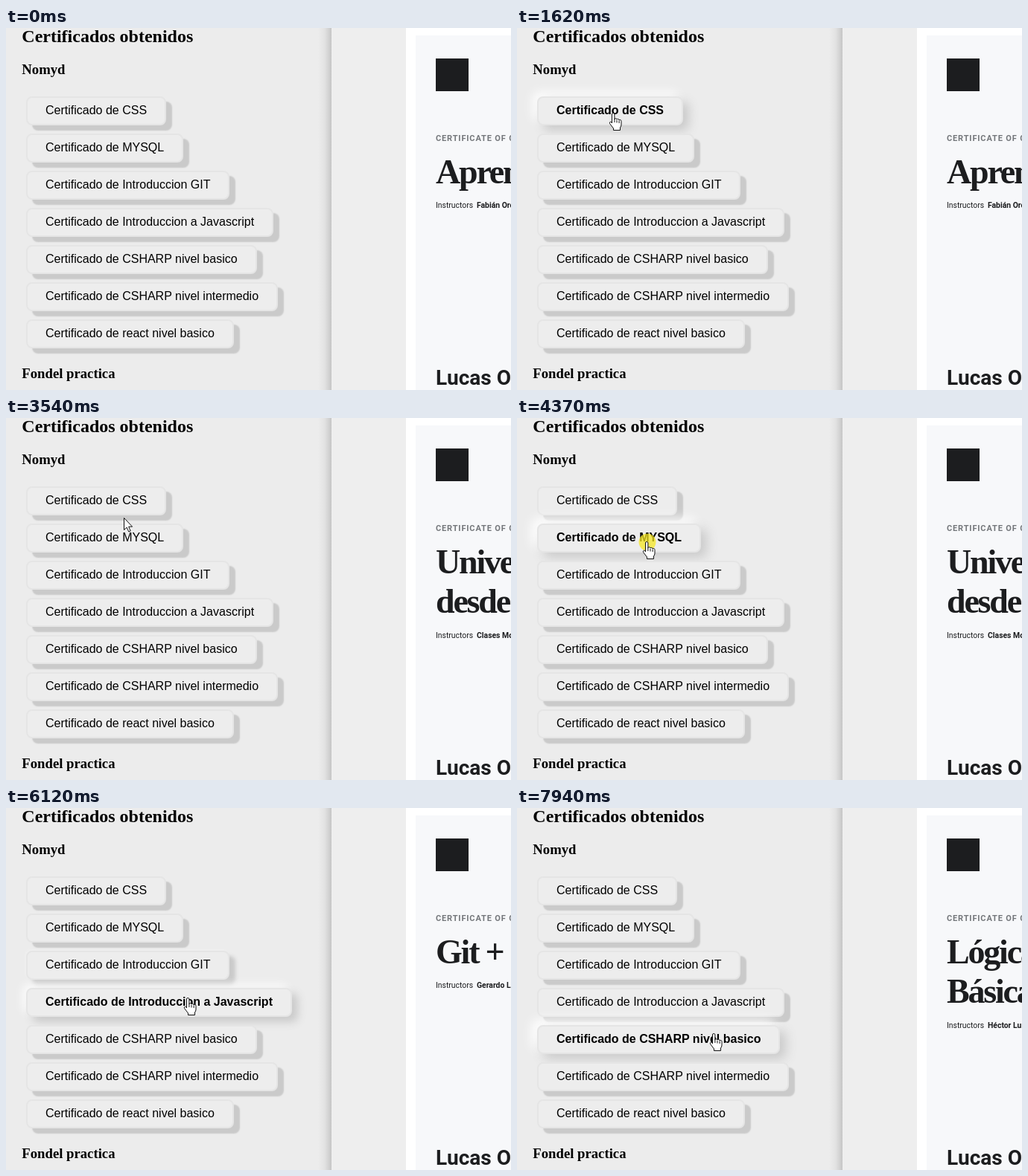
Animation of 678 by 487 pixels, one loop 8000 ms. Source, as an HTML page:

```html
<!DOCTYPE html>
<html lang="es">
<head>
<meta charset="utf-8">
<title>Certificados obtenidos</title>
<style>
  html, body { margin: 0; width: 100%; height: 100%; overflow: hidden; background: #ececec; }
  #stage { position: relative; width: 678px; height: 487px; overflow: hidden; background: #ececec; }
  svg { position: absolute; left: 0; top: 0; width: 678px; height: 487px; }
  .row {
    position: absolute; left: 27px; box-sizing: border-box; height: 39px;
    padding: 8px 24px 10px; border: 2px solid #e5e5e5; border-radius: 8px;
    background: #ededed; color: #000; white-space: nowrap;
    font: 16px/17px "Liberation Sans", Arial, sans-serif;
  }
  .heading { font-family: "Liberation Serif", "Times New Roman", serif; font-weight: 700; }
  .title { font: 700 46px "Liberation Serif", "Times New Roman", serif; letter-spacing: -2.2px; fill: #1c1d1f; }
  .sans { font-family: Roboto, "Liberation Sans", sans-serif; fill: #1c1d1f; }
</style>
</head>
<body>
<div id="stage">
  <svg viewBox="0 0 678 487">
    <defs>
      <linearGradient id="edge">
        <stop offset="0" stop-color="#ececec"/>
        <stop offset=".5" stop-color="#e2e2e2"/>
        <stop offset="1" stop-color="#c6c6c6"/>
      </linearGradient>
    </defs>
    <rect x="419" width="18" height="487" fill="url(#edge)"/>
    <rect x="437" width="100" height="487" fill="#eeeeee"/>
    <rect x="537" width="141" height="487" fill="#fff"/>
    <rect x="550" y="10" width="128" height="477" fill="#f7f8fa"/>

    <g class="heading">
      <text x="21.3" y="19" font-size="24">Certificados obtenidos</text>
      <text x="21.3" y="62" font-size="18.72">Nomyd</text>
      <text x="21.3" y="471" font-size="18.72">Fondel practica</text>
    </g>

    <rect x="577" y="41" width="44" height="44" fill="#1c1d1f"/>
    <text class="sans" x="577" y="152" font-size="11" font-weight="700" letter-spacing=".85" style="fill:#73767a">CERTIFICATE OF COMPLETION</text>
    <text class="title" id="line1" x="577" y="209"></text>
    <text class="title" id="line2" x="577" y="262"></text>
    <g class="sans" id="teacher" font-size="10.4">
      <text x="577">Instructors</text>
      <text x="632" font-weight="700" id="teacherName"></text>
    </g>
    <text class="sans" x="577" y="480" font-size="28" font-weight="700">Lucas O</text>
  </svg>
  <div id="rows"></div>
  <svg viewBox="0 0 678 487">
    <g id="pointer">
      <circle id="click" r="11.5" fill="#f6e71c" opacity=".72"/>
      <path id="arrow" d="M.5 .5V16.5L4.2 13.2 6.8 19 9.2 18 6.7 12.2H11.6Z" fill="#fff" stroke="#111"/>
      <g id="hand" stroke="#111" stroke-linejoin="round" transform="translate(-.5 -1)">
        <path fill="#fff" d="M-2 14V2Q-2 .5-.3 .5T1.4 2V9Q1.6 7.6 3 7.6T4.5 9.2Q5 8.2 6.2 8.4T7.6 10Q8.2 9.2 9.4 9.6T10.5 11.5V16Q10.5 18 9 20V23.5H0V21L-5 14.5Q-5.6 12.6-4.2 12.2T-2 14Z"/>
        <path fill="none" d="M1.4 9V13M4.5 10V13.5M7.6 10.5V14"/>
      </g>
    </g>
  </svg>
</div>
<script>
const LOOP = 8000, FADE = 400;
const $ = id => document.getElementById(id);

// label, hover start, hover end
const rows = [
  ["CSS", 1300, 3050],
  ["MYSQL", 3690, 4720],
  ["Introduccion GIT", 4720, 5850],
  ["Introduccion a Javascript", 5850, 7000],
  ["CSHARP nivel basico", 7000, 9000],
  ["CSHARP nivel intermedio"],
  ["react nivel basico"],
].map(([label, start = Infinity, end = Infinity], i) => {
  const el = document.createElement("div");
  el.className = "row";
  el.style.top = 92 + 50 * i + "px";
  el.textContent = "Certificado de " + label;
  $("rows").append(el);
  return { el, start, end };
});

// start time, first line, second line, instructor
const certificates = [
  [0, "Aprende", "", "Fabián Oro"],
  [2400, "Universo", "desde", "Clases Mo"],
  [4510, "Curso", "Infinito", "Bernardo"],
  [5550, "Git +", "", "Gerardo L"],
  [6750, "JavaScript", "Moderno", "Ernesto P"],
  [7730, "Lógica", "Básica", "Héctor Lun"],
];

// time, x, y
const path = [
  [530, 575, 440], [950, 100, 68], [1060, 103, 139], [1270, 112, 130],
  [1690, 131, 114], [1830, 135, 113], [2470, 135, 113], [2800, 152, 126],
  [3070, 152, 126], [3270, 157, 131], [3500, 157, 131], [3750, 175, 167],
  [4510, 175, 167], [4990, 206, 210], [5550, 206, 210], [5840, 245, 256],
  [6750, 246, 256], [7030, 265, 304],
];
const clicks = [2260, 4370, 5410, 6610, 7590];

const clamp = v => Math.min(1, Math.max(0, v));
const smooth = v => v * v * (3 - 2 * v);
const mix = (a, b, k) => a + (b - a) * k;

function pointerAt(t) {
  const next = path.findIndex(p => p[0] > t);
  if (next < 0) return path.at(-1).slice(1);
  const a = path[Math.max(0, next - 1)], b = path[next];
  const k = smooth(clamp((t - a[0]) / (b[0] - a[0])));
  return [mix(a[1], b[1], k), mix(a[2], b[2], k)];
}

function drawRow({ el, start, end }, t) {
  const level = clamp((t - start) / FADE) - clamp((t - end) / FADE);
  const k = smooth(clamp(level));
  el.style.fontWeight = level > .5 ? 700 : 400;
  el.style.boxShadow =
    `8px 7px ${mix(1.5, 15, k)}px #cacaca, ${-7 * k}px ${-7 * k}px ${15 * k}px rgba(255,255,255,${k})`;
}

function drawCertificate(t) {
  const [, first, second, name] = certificates.findLast(c => c[0] <= t);
  $("line1").textContent = first;
  $("line2").textContent = second;
  $("teacherName").textContent = name;
  $("teacher").setAttribute("transform", `translate(0 ${second ? 295.5 : 242})`);
}

function drawPointer(t) {
  const [x, y] = pointerAt(t);
  const i = Math.floor((y - 92) / 50);
  const onRow = i >= 0 && i < rows.length && (y - 92) % 50 < 38 &&
    x > 27 && x < 27 + rows[i].el.offsetWidth;
  const show = (id, on) => $(id).style.display = on ? "" : "none";
  show("pointer", t >= path[0][0]);
  show("hand", onRow);
  show("arrow", !onRow);
  show("click", clicks.some(c => t >= c && t < c + 140));
  $("pointer").setAttribute("transform", `translate(${Math.round(x)} ${Math.round(y)})`);
}

function draw(t) {
  rows.forEach(row => drawRow(row, t));
  drawCertificate(t);
  drawPointer(t);
}

const origin = performance.now();
function tick() {
  draw((performance.now() - origin) % LOOP);
  requestAnimationFrame(tick);
}
tick();
</script>
</body>
</html>
```
